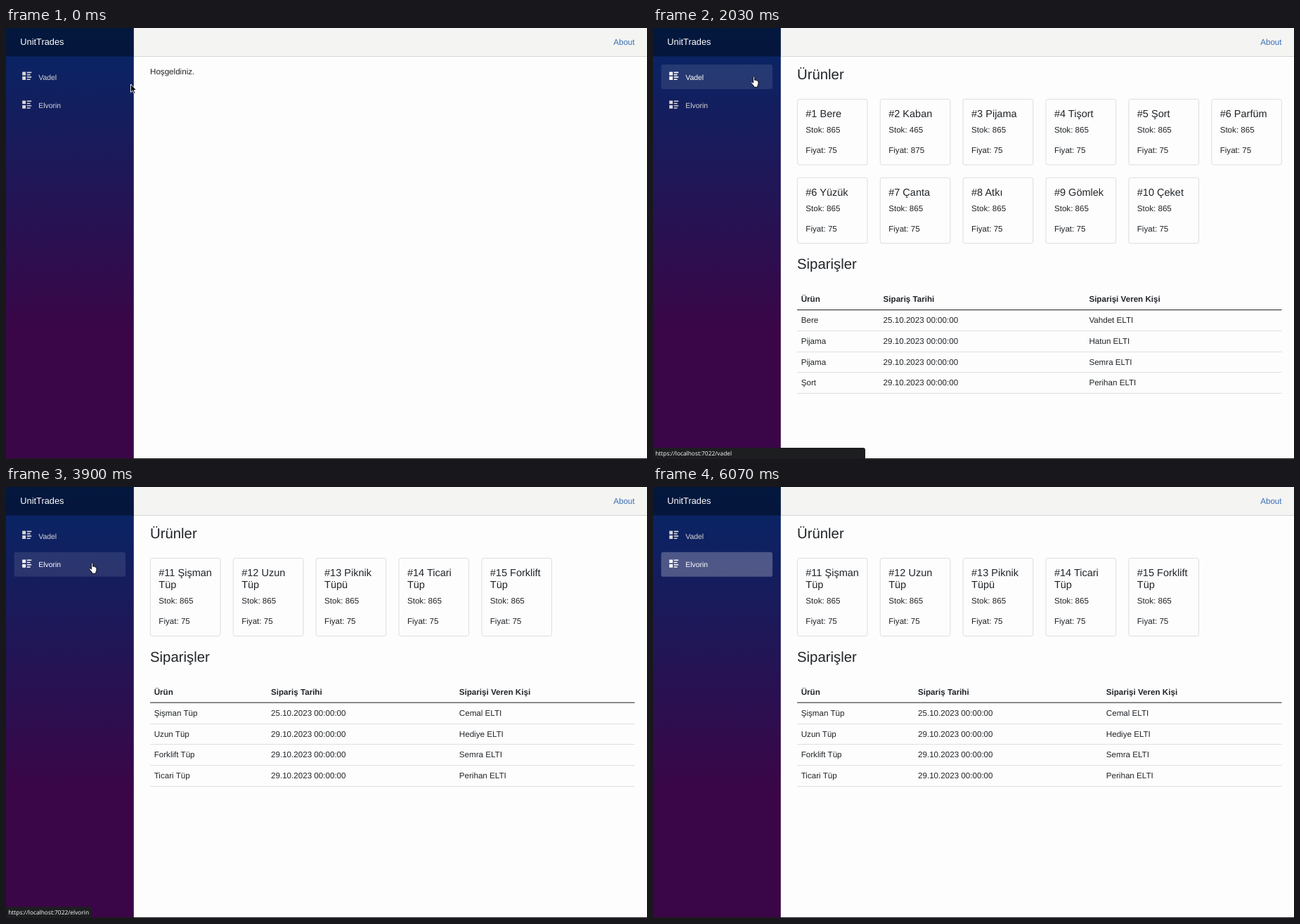
Animation, 912 px wide and 614 px high, one loop 6.71 s. Source, as an HTML page with a canvas:

```html
<!DOCTYPE html>
<html lang="tr">
<head>
<meta charset="utf-8">
<title>UnitTrades</title>
<style>
html, body { margin: 0; width: 100%; height: 100%; overflow: hidden; background: #fdfdfd; }
canvas { display: block; }
</style>
</head>
<body>
<canvas id="stage" width="912" height="614"></canvas>
<script>
const W = 912, H = 614, LOOP = 6710;
const ctx = document.getElementById('stage').getContext('2d');
ctx.textRendering = 'geometricPrecision';
ctx.fontKerning = 'normal';
const SANS = '"Liberation Sans", Arial, sans-serif';
const UI = '"Open Sans", "Noto Sans", sans-serif';
const SIDE = 181.8, LEFT = 205, RIGHT = 894.6, INK = '#212529';

const nav = [{ name: 'Vadel', y: 52 }, { name: 'Elvorin', y: 92.8 }];
const pageTimes = [470, 3400];

const pages = [
  {
    cards: ['#1 Bere', '#2 Kaban', '#3 Pijama', '#4 Tişort', '#5 Şort', '#6 Parfüm',
      '#6 Yüzük', '#7 Çanta', '#8 Atkı', '#9 Gömlek', '#10 Çeket'],
    extra: 0, ordersY: 343.4, cols: [210.7, 327.6, 620.4],
    rows: [['Bere', 25, 'Vahdet ELTI'], ['Pijama', 29, 'Hatun ELTI'],
      ['Pijama', 29, 'Semra ELTI'], ['Şort', 29, 'Perihan ELTI']]
  },
  {
    cards: ['#11 Şişman|Tüp', '#12 Uzun|Tüp', '#13 Piknik|Tüpü', '#14 Ticari|Tüp', '#15 Forklift|Tüp'],
    extra: 17.4, ordersY: 249, cols: [210.7, 377, 644.8],
    rows: [['Şişman Tüp', 25, 'Cemal ELTI'], ['Uzun Tüp', 29, 'Hediye ELTI'],
      ['Forklift Tüp', 29, 'Semra ELTI'], ['Ticari Tüp', 29, 'Perihan ELTI']]
  }
];

// time, x, y, easing power towards this point
const path = [
  [0, 177.5, 80, 1], [30, 177.5, 80, 1], [330, 143.5, 69, 1],
  [2650, 143.5, 69, 1], [3000, 122.5, 108, 1],
  [5000, 122.5, 108, 1], [5500, 476, 471, 4], [5820, 694, 616, 1]
];

// address bar hints: start, fade-out start, fade-out end, minimum width
const hints = [
  { url: 'https://localhost:7022/vadel', from: 470, out: 2880, end: 2880, min: 302 },
  { url: 'https://localhost:7022/elvorin', from: 2880, out: 5620, end: 5820, min: 0 }
];

const icon = new Path2D('M0 0h3v3h-3zM4 0h4v1h-4zM4 2h3v1h-3zM0 4h3v3h-3zM4 4h4v1h-4zM4 6h3v1h-3z');
const arrow = new Path2D('M0 0V16.5L3.8 13L6.4 19L9 17.9L6.4 12H11.5Z');
const hand = new Path2D('M5 13V2Q5 .5 6.5 .5Q8 .5 8 2V7.5Q9.5 6.5 11 8Q12.5 7.5 13.5 9' +
  'Q15.5 8.8 15.5 11V15Q15.5 17 14 18.5V21.5H6.5V19.5Q4.5 17 1.2 13.2Q.3 11.5 1.8 11Q3 10.7 5 13Z');

function text(str, x, y, size = 11.62, color = INK, weight = '', family = SANS) {
  ctx.font = `${weight} ${size}px ${family}`;
  ctx.fillStyle = color;
  ctx.fillText(str, x, y);
}

function rect(x, y, w, h, color) {
  ctx.fillStyle = color;
  ctx.fillRect(x, y, w, h);
}

function round(x, y, w, h, r) {
  ctx.beginPath();
  ctx.roundRect(x, y, w, h, r);
}

function cursorAt(t) {
  const i = path.findIndex(p => p[0] > t);
  if (i < 0) return null;
  const [t0, x0, y0] = path[i - 1], [t1, x1, y1, power] = path[i];
  const k = ((t - t0) / (t1 - t0)) ** power;
  return { x: x0 + (x1 - x0) * k, y: y0 + (y1 - y0) * k };
}

function drawSidebar(active, hover) {
  const g = ctx.createLinearGradient(0, 0, 0, H);
  g.addColorStop(0, 'rgb(5,39,103)');
  g.addColorStop(0.7, '#3a0647');
  rect(0, 0, SIDE, H, g);
  rect(0, 0, SIDE, 40.5, 'rgba(0,0,0,.4)');
  text('UnitTrades', 20.3, 24.4, 12.8, '#fff');
  nav.forEach((item, i) => {
    const lit = i === hover || i === active;
    if (lit) {
      round(11.6, item.y, 158.4, 35, 2.9);
      ctx.fillStyle = `rgba(255,255,255,${i === hover ? 0.1 : 0.25})`;
      ctx.fill();
    }
    const color = lit ? '#fff' : '#d7d7d7';
    ctx.save();
    ctx.translate(23.2, item.y + 10.6);
    ctx.scale(1.63, 1.63);
    ctx.fillStyle = color;
    ctx.fill(icon);
    ctx.restore();
    text(item.name, 46.2, item.y + 21.5, 10.46, color);
  });
}

function drawCard(title, i, extra) {
  const x = LEFT + 117.87 * (i % 6), y = 101 + 111.8 * Math.floor(i / 6);
  round(x + 0.4, y + 0.4, 99.6, 93.6 + extra, 2.9);
  ctx.strokeStyle = '#dadada';
  ctx.lineWidth = 0.9;
  ctx.stroke();
  const tx = x + 12.3;
  title.split('|').forEach((line, n) => text(line, tx, y + 25.8 + 17.4 * n, 14.53));
  const second = title === '#2 Kaban';
  text('Stok: ' + (second ? 465 : 865), tx, y + 48 + extra);
  text('Fiyat: ' + (second ? 875 : 75), tx, y + 77 + extra);
}

function drawPage(page) {
  text('Ürünler', LEFT, 72.8, 20.34);
  page.cards.forEach((c, i) => drawCard(c, i, page.extra));
  const y = page.ordersY;
  text('Siparişler', LEFT, y, 20.34);
  ['Ürün', 'Sipariş Tarihi', 'Siparişi Veren Kişi'].forEach((h, i) =>
    text(h, page.cols[i], y + 47, 11.62, INK, 'bold'));
  rect(LEFT, y + 57.6, RIGHT - LEFT, 1.1, '#303236');
  page.rows.forEach(([product, day, person], r) => {
    const ry = y + 76.8 + 29.75 * r;
    [product, day + '.10.2023 00:00:00', person].forEach((s, i) => text(s, page.cols[i], ry));
    rect(LEFT, Math.round(ry + 10.7), RIGHT - LEFT, 1, '#dcdfe2');
  });
}

function drawHint(t) {
  const h = hints.find(v => t >= v.from && t < v.end);
  if (!h) return;
  ctx.globalAlpha = t < h.out ? 1 : (h.end - t) / (h.end - h.out);
  ctx.font = `8.4px ${UI}`;
  const w = Math.max(h.min, ctx.measureText(h.url).width + 7);
  round(0, 598, w, 15.5, [0, 3, 0, 0]);
  ctx.fillStyle = '#1d1e20';
  ctx.fill();
  text(h.url, 3.2, 609, 8.4, '#fff', '', UI);
  ctx.globalAlpha = 1;
}

function drawCursor(p, pointing) {
  ctx.save();
  ctx.translate(p.x, p.y);
  ctx.scale(0.71, 0.71);
  if (pointing) ctx.translate(-6.5, 0);
  const shape = pointing ? hand : arrow;
  ctx.fillStyle = pointing ? '#fff' : '#000';
  ctx.strokeStyle = pointing ? '#000' : '#fff';
  ctx.lineWidth = 1.3;
  ctx.fill(shape);
  ctx.stroke(shape);
  ctx.restore();
}

function draw(t) {
  const active = pageTimes.filter(p => t >= p).length - 1;
  const p = cursorAt(t);
  const hover = p ? nav.findIndex(n => p.x > 11.6 && p.x < 170 && p.y > n.y && p.y < n.y + 35) : -1;
  rect(0, 0, W, H, '#fdfdfd');
  rect(SIDE, 0, W - SIDE, 40, '#f4f4f3');
  rect(SIDE, 40, W - SIDE, 1, '#d6d5d5');
  text('About', 864.2, 24, 11.62, '#3a70b4');
  drawSidebar(active, hover);
  if (active < 0) text('Hoşgeldiniz.', LEFT, 66);
  else drawPage(pages[active]);
  rect(0, 613, W, 1, '#1c1c1c');
  drawHint(t);
  if (p) drawCursor(p, hover >= 0);
}

const start = performance.now();
function tick() {
  draw((performance.now() - start) % LOOP);
  requestAnimationFrame(tick);
}
tick();
</script>
</body>
</html>
```
